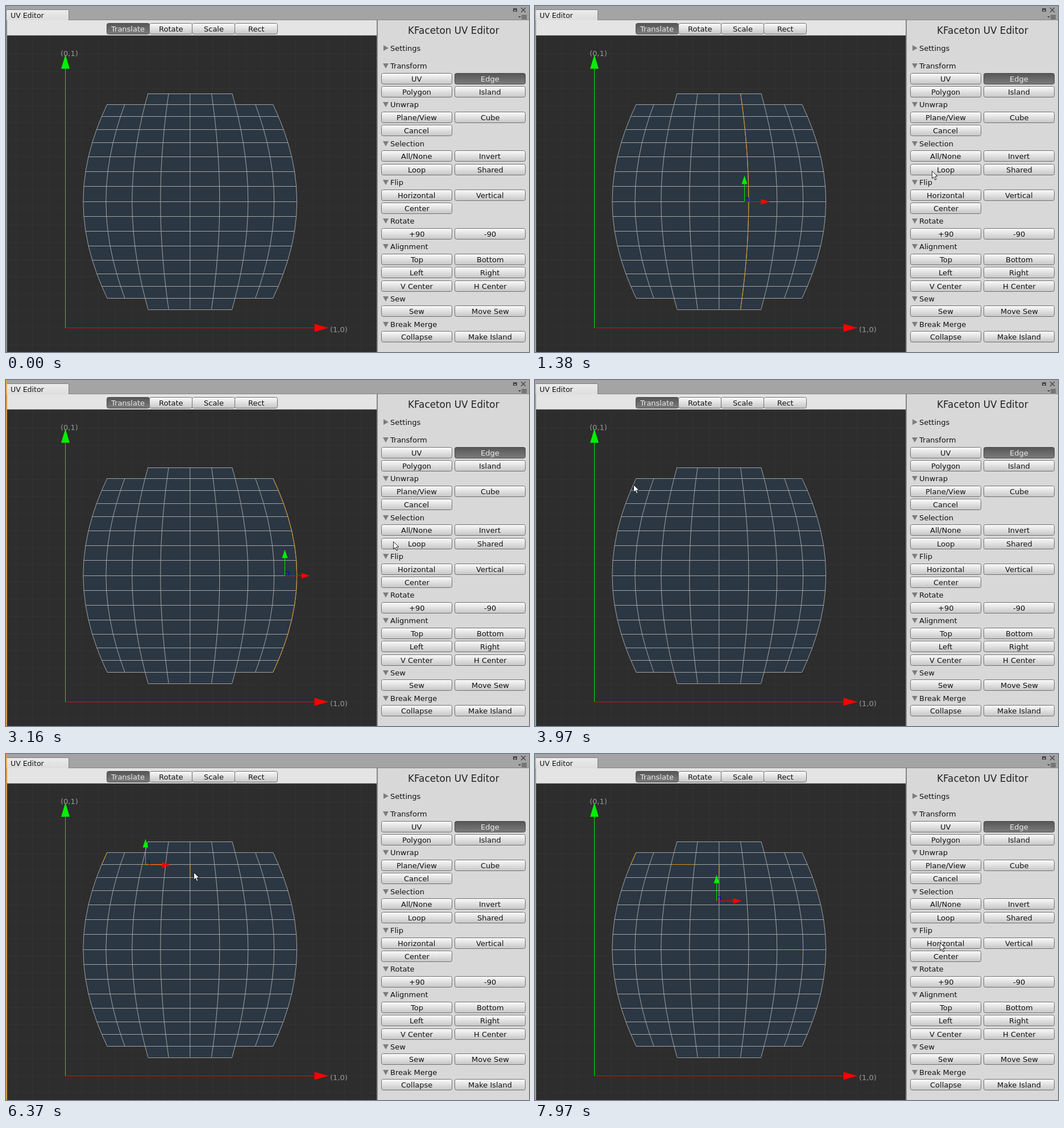
Animation, 920 px wide and 609 px high, one loop 8 s. Source, as an HTML page with a canvas:

```html
<!DOCTYPE html>
<html lang="en">
<head>
<meta charset="utf-8">
<title>UV Editor</title>
<style>
html, body { margin: 0; width: 100%; height: 100%; overflow: hidden; background: #d8d8d8; }
canvas { display: block; }
</style>
</head>
<body>
<canvas id="stage" width="920" height="609"></canvas>
<script>
const ctx = document.getElementById('stage').getContext('2d');
const LOOP = 8000;
const LINE = '#a3a5a6', PICK = '#d6921e', GREEN = '#00f000', RED = '#ff0000';

// The mesh is a barrel: columns -4..4, rows -8..8 around its centre
const range = (a, b) => Array.from({ length: b - a + 1 }, (_, i) => a + i);
const col = (j, a, b) => range(a, b).map(n => point(j, n));
const row = (n, a, b) => range(a, b).map(j => point(j, n));

function point(j, n) {
  const dy = 262 * Math.sin(0.1013 * n);
  return [323.8 + 262 * Math.sin(0.2 * j) * Math.cos(0.004 * dy), 343.7 + dy];
}

const inner = col(1, -7, -6), right = col(4, -7, -6), left = col(-4, -7, -6);
const across = row(-6, -2, -1), middle = col(0, -6, -5), side = row(0, 2, 3);
const loopButton = [698, 290], empty = [573, 292];

// Each step: start and end of the move, time of the click, place, selection after it.
// A place is a point or an edge, whose midpoint is meant.
const steps = [
  [60, 400, 460, inner, [inner]],
  [540, 1160, 1380, loopButton, [col(1, -8, 8)]],
  [1550, 1850, 1910, empty, []],
  [1910, 2370, 2430, right, [right]],
  [2600, 2880, 3080, loopButton, [col(4, -7, 7)]],
  [3100, 3360, 3640, empty, []],
  [3640, 3960, 4060, left, [left]],
  [4480, 5040, 5040, [292, 188], [left]],
  [5200, 5470, 5620, across, [left, across]],
  [5700, 6060, 6240, middle, [left, across, middle]],
  [6300, 6850, 6850, side, [left, across, middle]],
  [7100, 7180, 7180, [505, 367], [left, across, middle]],
  [7190, 7300, 7560, side, [left, across, middle, side]],
  [7810, 7970, 7970, [712, 332], [left, across, middle, side]]
].map(([from, to, click, place, pick]) => ({
  from, to, click, pick,
  at: place[0].length ? [0, 1].map(k => (place[0][k] + place[1][k]) / 2) : place,
  press: place === loopButton
}));

const sections = [
  ['Transform', 'UV', 'Edge', 'Polygon', 'Island'],
  ['Unwrap', 'Plane/View', 'Cube', 'Cancel'],
  ['Selection', 'All/None', 'Invert', 'Loop', 'Shared'],
  ['Flip', 'Horizontal', 'Vertical', 'Center'],
  ['Rotate', '+90', '-90'],
  ['Alignment', 'Top', 'Bottom', 'Left', 'Right', 'V Center', 'H Center'],
  ['Sew', 'Sew', 'Move Sew'],
  ['Break Merge', 'Collapse', 'Make Island']
];

function rect(x, y, w, h, color) {
  ctx.fillStyle = color;
  ctx.fillRect(x, y, w, h);
}

function box(x, y, w, h, radius, from, to, edge) {
  const g = ctx.createLinearGradient(0, y, 0, y + h);
  g.addColorStop(0, from);
  g.addColorStop(1, to);
  ctx.beginPath();
  ctx.roundRect(x, y, w, h, radius);
  ctx.fillStyle = g;
  ctx.fill();
  ctx.strokeStyle = edge;
  ctx.lineWidth = 1;
  ctx.stroke();
}

function trace(pts) {
  ctx.beginPath();
  pts.forEach(p => ctx.lineTo(p[0], p[1]));
}

function stroke(pts, color, width = 1) {
  trace(pts);
  ctx.strokeStyle = color;
  ctx.lineWidth = width;
  ctx.stroke();
}

function fill(pts, color) {
  trace(pts);
  ctx.fillStyle = color;
  ctx.fill();
}

function text(s, x, y, color = '#111', size = 13, centered = false) {
  ctx.font = size + 'px "DejaVu Sans", sans-serif';
  ctx.fillStyle = color;
  if (centered) x -= ctx.measureText(s).width / 2;
  ctx.fillText(s, Math.round(x), Math.round(y + size * 0.36));
}

function button(label, x, y, w, on) {
  y = Math.round(y);
  const look = on ? ['#565656', '#7c7c7c', '#484848'] : ['#fbfbfb', '#c6c6c6', '#707070'];
  box(x + 0.5, y - 9.5, w - 1, 19, 3, ...look);
  text(label, x + w / 2, y, on ? '#ececec' : '#111', 13, true);
}

function foldout(label, y, open) {
  y = Math.round(y);
  ctx.save();
  ctx.translate(668, y);
  if (open) ctx.rotate(Math.PI / 2);
  fill([[-4, -5], [5, 0], [-4, 5]], '#7d7d7d');
  ctx.restore();
  text(label, 676, y);
}

function drawFrame() {
  rect(0, 0, 920, 609, '#d8d8d8');
  rect(0, 0, 920, 25, '#a4a4a4');
  rect(0, 24, 920, 1, '#858585');
  box(0.5, 6.5, 110, 22, 2, '#ececec', '#dadada', '#7c7c7c');
  text('UV Editor', 8, 16, '#111', 12.5);

  // Window icons
  rect(892, 4, 7, 6, '#484848');
  rect(894, 7, 3, 2, '#a4a4a4');
  stroke([[906, 3], [914, 11]], '#484848', 1.4);
  stroke([[914, 3], [906, 11]], '#484848', 1.4);
  fill([[901, 18], [906, 18], [903.5, 21]], '#484848');
  for (let y = 16; y < 24; y += 2) rect(907, y, 9, 1, '#484848');

  rect(0, 25, 653, 28, '#e4e4e4');
  rect(0, 51, 653, 1, '#bdbdbd');
  rect(652, 25, 2, 584, '#858585');
  rect(0, 25, 2, 584, '#8c8c8c');
  ['Translate', 'Rotate', 'Scale', 'Rect'].forEach((s, i) => button(s, 177 + 75 * i, 40, 76, !i));
}

function drawPanel(pressed) {
  text('KFaceton UV Editor', 787, 42.5, '#222', 16.8, true);
  foldout('Settings', 74, false);
  let y = 105;
  for (const [name, ...items] of sections) {
    foldout(name, y, true);
    y += 22.65;
    items.forEach((s, i) => {
      if (i && i % 2 === 0) y += 23.35;
      button(s, i % 2 ? 789 : 660, y, 125, s === 'Edge' || (s === 'Loop' && pressed));
    });
    y += 22.3;
  }
}

function arrow(x, y, dx, dy, len, head, half, color) {
  const bx = x + dx * (len - head), by = y + dy * (len - head);
  stroke([[x, y], [bx, by]], color);
  fill([[bx - dy * half, by + dx * half], [x + dx * len, y + dy * len], [bx + dy * half, by - dx * half]], color);
}

function drawView(chains) {
  ctx.save();
  ctx.beginPath();
  ctx.rect(2, 52, 650, 557);
  ctx.clip();
  rect(2, 52, 650, 557, '#2d2d2d');
  for (let i = -3; i < 20; i++) {
    rect(Math.round(104 + 28.9 * i), 52, 1, 557, '#323232');
    rect(2, Math.round(566 - 30.1 * i), 650, 1, '#323232');
  }

  for (const [j, n] of [[4, 7], [2, 8]]) {
    fill([...col(-j, -n, n), ...col(j, -n, n).reverse()], '#2b3742');
  }
  for (let j = -4; j <= 4; j++) {
    const n = Math.abs(j) > 2 ? 7 : 8;
    stroke(col(j, -n, n), LINE);
  }
  for (let n = -8; n <= 8; n++) {
    const j = Math.abs(n) > 7 ? 2 : 4;
    stroke(crisp([point(-j, n), point(j, n)]), LINE);
  }

  arrow(104.5, 566.5, 0, -1, 481, 25, 7.5, GREEN);
  arrow(104.5, 566.5, 1, 0, 463, 25, 7, RED);
  text('(0,1)', 111.5, 83, '#999', 13, true);
  text('(1,0)', 585.5, 569, '#999', 13, true);

  chains.forEach(c => stroke(crisp(c), PICK));
  if (chains.length) drawGizmo(chains.flat());
  ctx.restore();
}

// Puts level lines on whole pixels
function crisp(pts) {
  const level = pts.every(p => p[1] === pts[0][1]);
  return level ? pts.map(p => [p[0], Math.round(p[1]) + 0.5]) : pts;
}

function drawGizmo(pts) {
  const [cx, cy] = [0, 1].map(k => {
    const v = pts.map(p => p[k]);
    return (Math.min(...v) + Math.max(...v)) / 2;
  });
  const x = Math.floor(cx - 0.7) + 0.5, y = Math.round(cy) + 0.5;
  ctx.strokeStyle = '#0000e0';
  ctx.lineWidth = 1;
  ctx.strokeRect(x, y - 7, 7, 7);
  arrow(x, y, 0, -1, 46, 15, 5, GREEN);
  arrow(x, y, 1, 0, 44, 15, 5, RED);
}

// Eased moves that bow upwards a little
function cursorAt(t) {
  const i = steps.findLastIndex(s => s.from <= t);
  if (i < 0) return null;
  const [x, y] = steps[i].at, [px, py] = i ? steps[i - 1].at : [811, 420];
  const v = Math.min(1, (t - steps[i].from) / (steps[i].to - steps[i].from));
  const u = v * v * (3 - 2 * v);
  const bow = 0.12 * Math.hypot(x - px, y - py) * Math.sin(Math.PI * u);
  return [px + (x - px) * u, py + (y - py) * u - bow];
}

function drawCursor(t) {
  const p = cursorAt(t);
  if (!p) return;
  ctx.save();
  ctx.translate(Math.round(p[0]) + 0.5, Math.round(p[1]) + 0.5);
  const shape = [[0, 0], [0, 13], [3, 10.3], [5.2, 15.5], [7.4, 14.6], [5.2, 9.5], [9.3, 9.3], [0, 0]];
  fill(shape, '#fff');
  stroke(shape, '#111', 0.9);
  ctx.restore();
}

function draw() {
  const t = performance.now() % LOOP;
  const done = steps.findLast(s => s.click <= t);
  drawFrame();
  drawPanel(steps.some(s => s.press && t >= s.click - 80 && t < s.click));
  drawView(done ? done.pick : []);
  if (t >= 60) rect(0, 0, 1.5, 609, '#f29a2e');
  drawCursor(t);
  requestAnimationFrame(draw);
}
draw();
</script>
</body>
</html>
```
